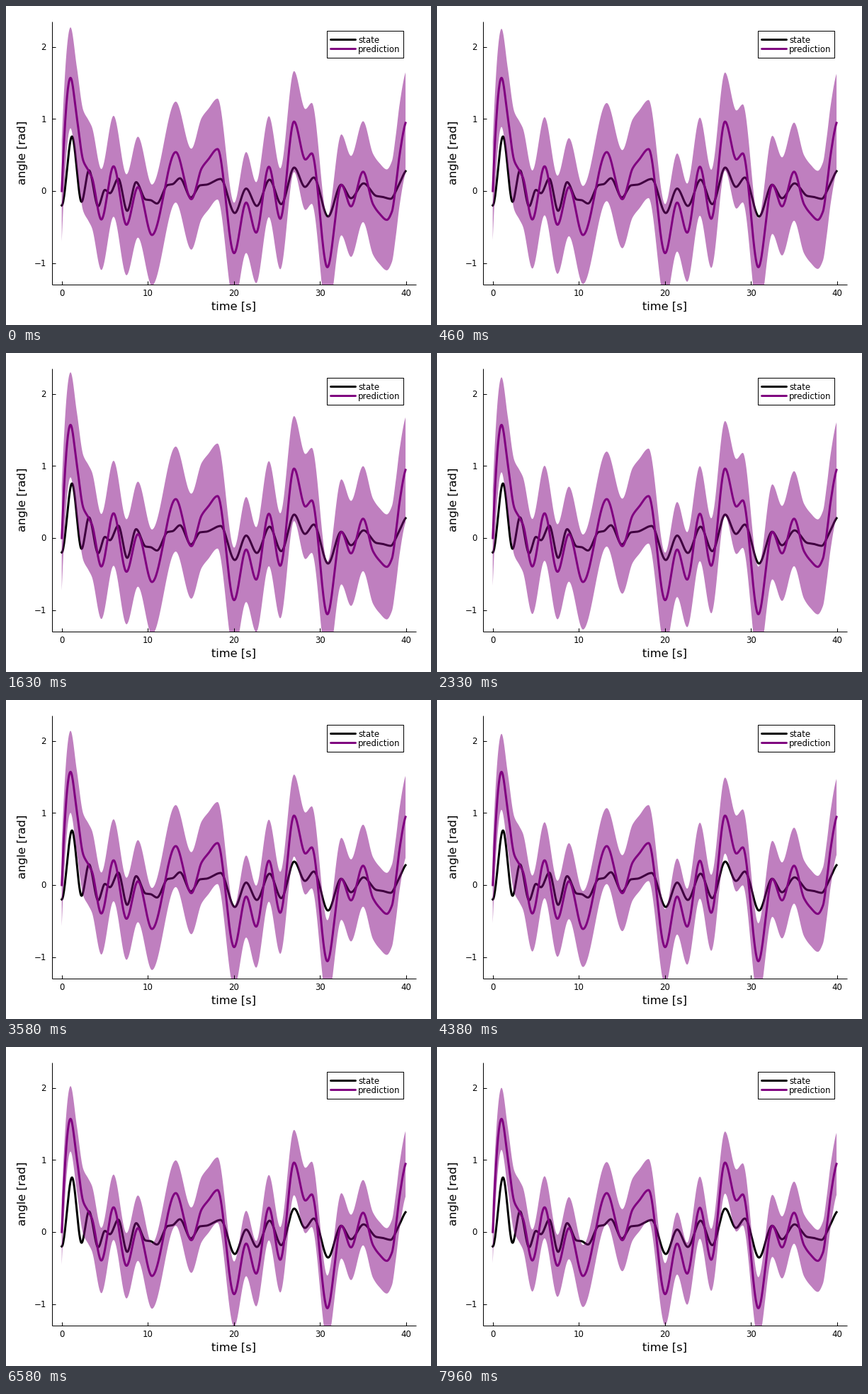
Animation of 600 by 450 pixels, one loop 8 s. Source, as a matplotlib script:

```python
import numpy as np
import matplotlib.pyplot as plt
from matplotlib.animation import FuncAnimation
from matplotlib.patches import Polygon, Rectangle

W, H, DPI = 600, 450, 100
PT = 72 / DPI                      # points per pixel
FRAMES, INTERVAL = 200, 40
LEFT, RIGHT, TOP, BOTTOM = 64.5, 578.5, 22, 392.5
PURPLE = "#800080"

# (time, angle) knots: mostly the extrema of each curve
STATE = [
    (0, -.2), (1.19, .757), (2.3, -.15), (3.16, .287), (4.23, -.212),
    (5.01, .015), (5.6, -.03), (6.57, .172), (7.6, -.275), (8.64, .123),
    (9.75, -.118), (10.3, -.126), (11.06, -.173), (12.3, .083),
    (12.87, .095), (13.73, .177), (15, -.09), (16.08, .079), (16.8, .088),
    (18.46, .167), (20.1, -.305), (21.42, .034), (22.66, -.207),
    (24.14, .157), (25.5, -.182), (27, .325), (28.25, .057), (29.28, .187),
    (30.93, -.354), (32.45, .087), (33.6, -.1), (35.06, .106),
    (36.56, -.069), (37.2, -.08), (38.2, -.108), (39.05, .06), (39.93, .275),
]
PREDICTION = [
    (0, 0), (1.02, 1.57), (1.75, 1.02), (2.5, .42), (3.1, .285), (3.5, .19),
    (4.6, -.395), (6.02, .343), (7.52, -.468), (8.85, .053), (10.48, -.61),
    (13.24, .54), (15.05, -.113), (16.25, .315), (17, .435), (18.1, .582),
    (20.02, -.862), (21.42, -.16), (22.58, -.577), (24.06, .337),
    (25.38, -.385), (26.98, .963), (28.3, .437), (29.04, .522),
    (30.85, -1.057), (32.48, .085), (33.6, -.213), (35, .268),
    (36.16, -.185), (36.9, -.312), (37.75, -.4), (38.35, -.285),
    (38.8, .07), (39.25, .51), (39.93, .945),
]
# (seconds of animation, half width of the band)
SPREAD = [
    (0, .70), (.27, .672), (.46, .682), (.87, .772), (1.25, .757),
    (1.67, .722), (2.5, .643), (3.33, .583), (4.17, .536), (5, .5),
    (5.83, .473), (6.67, .451), (7.5, .436), (8, .43),
]


def smooth(knots, x, start=None, end=None):
    """Monotone cubic interpolation, flat at local extrema."""
    kx, ky = np.array(knots, float).T
    h = np.diff(kx)
    d = np.diff(ky) / h
    m = np.zeros_like(ky)
    w1, w2 = 2 * h[1:] + h[:-1], h[1:] + 2 * h[:-1]
    same = d[:-1] * d[1:] > 0
    m[1:-1][same] = ((w1 + w2)[same]
                     / (w1[same] / d[:-1][same] + w2[same] / d[1:][same]))
    m[0] = d[0] if start is None else start
    m[-1] = d[-1] if end is None else end
    i = np.clip(np.searchsorted(kx, x, side="right") - 1, 0, len(h) - 1)
    s = (x - kx[i]) / h[i]
    return ((1 + 2 * s) * (1 - s) ** 2 * ky[i] + s * (1 - s) ** 2 * h[i] * m[i]
            + s * s * (3 - 2 * s) * ky[i + 1] + s * s * (s - 1) * h[i] * m[i + 1])


def px(t):
    return 78.7 + 12.155 * t


def py(v):
    return 261 - 101.7 * v


plt.rcParams["font.family"] = "DejaVu Sans"
fig = plt.figure(figsize=(W / DPI, H / DPI), dpi=DPI, facecolor="white")
ax = fig.add_axes([0, 0, 1, 1])
ax.set_xlim(0, W)
ax.set_ylim(H, 0)
ax.axis("off")


def line(x, y, color="black", width=1, z=5, **kw):
    return ax.plot(x, y, color=color, lw=width * PT, zorder=z, **kw)[0]


def label(x, y, text, size=11.7, ha="center", **kw):
    ax.text(x, y, text, fontsize=size * PT, ha=ha, va="baseline", zorder=8, **kw)


# axes
line([LEFT, LEFT], [TOP, BOTTOM + .5], solid_capstyle="butt")
line([LEFT, RIGHT], [BOTTOM, BOTTOM], solid_capstyle="butt")
for t in range(0, 41, 10):
    line([px(t)] * 2, [BOTTOM, BOTTOM - 5], solid_capstyle="butt")
    label(px(t), 409, str(t))
for v in (-1, 0, 1, 2):
    line([LEFT, LEFT + 5], [py(v)] * 2, solid_capstyle="butt")
    label(57, py(v) + 4.4, str(v).replace("-", "\u2212"), ha="right")
label(321.5, 429, "time [s]", 16.2)
label(28, 207, "angle [rad]", 16.2, rotation=90, rotation_mode="anchor")

# curves
t = np.linspace(0, 39.93, 900)
state = smooth(STATE, t, start=0, end=.16)
mean = smooth(PREDICTION, t, start=2.9, end=.35)
line(px(t), py(state), width=3, z=1)
band = Polygon([(0, 0), (1, 1), (1, 0)], closed=True, fc=PURPLE, alpha=.5, lw=0, zorder=2)
ax.add_patch(band)
band.set_clip_path(Rectangle((LEFT, TOP), RIGHT - LEFT, BOTTOM - TOP,
                             transform=ax.transData))
line(px(t), py(mean), PURPLE, 3, 3)

# legend
ax.add_patch(Rectangle((452.5, 34.5), 108.5, 38.5, fc="white", ec="black",
                       lw=PT, zorder=6))
for y, name, color in ((47, "state", "black"), (60, "prediction", PURPLE)):
    line([458, 492.5], [y, y], color, 3, 7, solid_capstyle="round")
    label(497.3, y + 4.6, name, ha="left")


def update(i):
    half = smooth(SPREAD, np.array([i * INTERVAL / 1000]))[0]
    x = np.concatenate([px(t), px(t[::-1])])
    y = np.concatenate([py(mean + half), py((mean - half)[::-1])])
    band.set_xy(np.column_stack([x, y]))
    return (band,)


anim = FuncAnimation(fig, update, frames=FRAMES, interval=INTERVAL,
                     init_func=lambda: update(0), repeat=True, repeat_delay=0)
plt.show()
```
